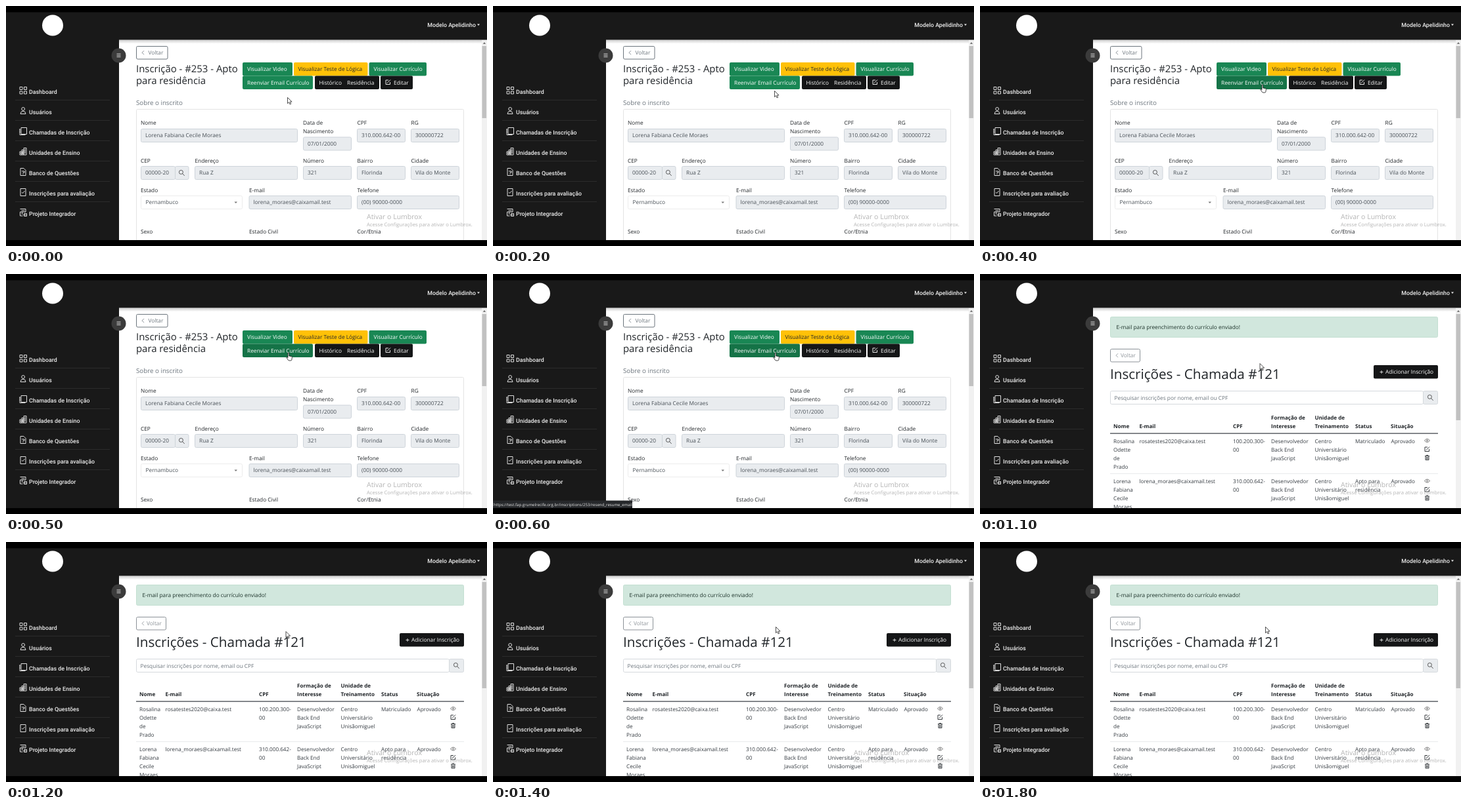
An HTML page that plays this animation: 732x366 px, repeating every 2.6 s.

```html
<!DOCTYPE html>
<html lang="pt-BR">
<head>
<meta charset="utf-8">
<title>Inscrições</title>
<style>
html, body { margin: 0; width: 100%; height: 100%; overflow: hidden; background: #000; }
svg { display: block; }
text { font: 8.3px "Open Sans", "Noto Sans", sans-serif; fill: #212529; text-rendering: geometricPrecision; white-space: pre; }
.side text { font: 500 8.8px Roboto, sans-serif; fill: #eee; }
</style>
</head>
<body>
<svg id="stage" width="732" height="366" viewBox="0 0 732 366"></svg>
<script>
const LOOP = 2600, INK = '#212529', DARK = '#151617', GREEN = '#198754', GREY = '#6c757d';

const text = (x, y, s, style = '') => `<text x="${x}" y="${y}" style="${style}">${s}</text>`;
const box = (x, y, w, h, fill, stroke = 'none', r = 0, extra = '') =>
  `<rect x="${x}" y="${y}" width="${w}" height="${h}" rx="${r}" fill="${fill}" stroke="${stroke}" ${extra}/>`;
const line = (d, x = 0, y = 0, color = INK, w = 1) =>
  `<path d="${d}" transform="translate(${x} ${y})" fill="none" stroke="${color}" stroke-width="${w}"/>`;
const group = (id, body, extra = '') => `<g id="${id}" ${extra}>${body}</g>`;
const lines = (x, y, list, style) => list.map((s, i) => text(x, y + i * 13.1, s, style)).join('');

const button = (x, y, w, label, fill, tx = x + 7, color = '#fff', id = '') =>
  box(x, y, w, 20.5, fill, 'none', 2, id && `id="${id}"`) + text(tx, y + 13.4, label, `fill:${color}`);
const field = (x, y, w, value) =>
  box(x + .5, y + .5, w - 1, 20, '#e9ecef', '#ced4da', 2) + text(x + 7, y + 13.4, value, 'fill:#495057');
const lens = (x, y) => line('M6.4 3.4a3 3 0 1 1-6 0a3 3 0 1 1 6 0M5.5 5.5l3.2 3.4', x, y, '#333', .8);
const back = (x, y, w, tx, color) =>
  box(x + .5, y + .5, w - 1, 19.5, '#fff', color, 2) +
  line('M3 0l-3 3l3 3', x + 9, y + 7.2, color, .8) + text(tx, y + 13.4, 'Voltar', `fill:${color}`);
const pencil = (x, y, color) => line('M4.5 1H.5v6.5H7V4M2.5 5.5L7.5.5', x, y, color, .9);
const scroll = h =>
  box(724, 52, 8, 305, '#f1f1f1') + box(724.5, 61, 6.5, h, '#c1c1c1') +
  '<path d="M725.8 58l2.2-3 2.2 3z" fill="#777"/>';

const MENU = [
  ['Dashboard', 'M.5.5h4v4h-4zM7 .5h4v4h-4zM.5 7h4v4h-4zM7 7h4v4h-4z'],
  ['Usuários', 'M8 3a2.4 2.4 0 1 1-4.8 0a2.4 2.4 0 1 1 4.8 0M1.500 10.5q0-4 4-4t4 4z'],
  ['Chamadas de Inscrição', 'M2.5.5H11v10H2.5zM.5 2v9.500h8.500M0 4h1.500M0 7h1.500'],
  ['Unidades de Ensino', 'M.5 11V6h3v5V3.5h3V11V.5h4V11zM8.5 2v7M5 5v5M2 7.5v2'],
  ['Banco de Questões', 'M1.5.5h5l3 3v8h-8zM3.5 5h4v2h-2v1.500M5 10h1'],
  ['Inscrições para avaliação', 'M1.5.5h8v11h-8zM3.5 6l1.5 1.5l3-3.5'],
  ['Projeto Integrador', 'M1 .5h8.5V5H1v6h4M3 3h5M7 7.5h4v4H7zM4 5v4M6 9.500h4']
];

const shell =
  box(0, 9.5, 732, 347.5, '#191919') +
  '<circle cx="71" cy="29.5" r="16" fill="#fff"/>' +
  text(715, 32, 'Modelo Apelidinho', 'text-anchor:end') +
  '<path d="M717 27.5h4l-2 2.5z" fill="#eee"/>' +
  MENU.map(([name, d], i) => {
    const y = 130 + i * 31;
    return line(d, 20.5, y - 7, '#ddd') + text(35, y + 3.6, name) +
      (i < 6 ? box(14, y + 13, 144, 1, '#2c2c2c') : '');
  }).join('');

const formPage =
  scroll(110) + back(198, 61, 48.5, 216.5, GREY) +
  text(198, 101, 'Inscrição - #253 - Apto', 'font-size:14.9px') +
  text(198, 119, 'para residência', 'font-size:14.9px') +
  button(360, 86, 76, 'Visualizar Video', GREEN) +
  button(438, 86, 112.5, 'Visualizar Teste de Lógica', '#ffc107', 444.5, INK) +
  button(552.5, 86, 87.5, 'Visualizar Currículo', GREEN, 559.5) +
  box(359, 105.5, 109, 22.5, 'none', '#8fc3aa', 3, 'id="ring" stroke-width="2"') +
  button(360, 106.5, 107, 'Reenviar Email Currículo', GREEN, 367, '#fff', 'send') +
  button(470, 106.5, 98, 'Histórico', DARK, 476.5) + text(519, 119.9, 'Residência', 'fill:#fff') +
  button(570, 106.5, 49, 'Editar', DARK, 590) + pencil(577.5, 112, '#fff') +
  text(198, 150.5, 'Sobre o inscrito', `font-size:9.75px;fill:${GREY}`) +
  box(198.5, 157.5, 498, 220, '#fff', '#e3e3e3', 2) +
  [[205, 181, 'Nome'], [452, 181, 'Data de'], [452, 194, 'Nascimento'], [534.5, 181, 'CPF'], [616.5, 181, 'RG'],
   [205, 239, 'CEP'], [287.5, 239, 'Endereço'], [452, 239, 'Número'], [534.5, 239, 'Bairro'], [616.5, 239, 'Cidade'],
   [205, 283.5, 'Estado'], [370, 283.5, 'E-mail'], [534.5, 283.5, 'Telefone'],
   [205, 347, 'Sexo'], [370, 347, 'Estado Civil'], [534.5, 347, 'Cor/Etnia']].map(a => text(...a)).join('') +
  [[205, 187, 239, 'Lorena Fabiana Cecile Moraes'], [452, 199.5, 74, '07/01/2000'],
   [534, 187, 74, '310.000.642-00'], [616, 187, 74, '300000722'],
   [205, 244, 53, '00000-20'], [257, 244, 21.5, ''], [287, 244, 157, 'Rua Z'], [452, 244, 74, '321'],
   [534, 244, 74, 'Florinda'], [616, 244, 74, 'Vila do Monte'],
   [369.5, 289, 156.5, 'lorena_moraes@caixamail.test'], [534, 289, 156, '(00) 90000-0000']].map(a => field(...a)).join('') +
  lens(263, 250) +
  box(205.5, 289.5, 154, 20, '#fff', '#ececec', 2) + text(212.5, 302.4, 'Pernambuco', 'fill:#495057') +
  '<path d="M347.5 298.5h4.5l-2.2 2.5z" fill="#777"/>';

const CELL = 'font-size:8.15px;fill:#343a40', HEAD = 'font-size:8.05px;font-weight:700';
const row = (y, name, mail, cpf, status) =>
  [[203, name], [242.5, [mail]], [385, cpf], [443, ['Desenvolvedor', 'Back End', 'JavaScript']],
   [509.5, ['Centro', 'Universitário', 'Unisãomiguel']], [571, status], [625.5, ['Aprovado']]]
    .map(([x, list]) => lines(x, y, list, CELL)).join('') +
  line('M0 3q4-5 8 0q-4 5-8 0M5 3a1 1 0 1 1-2 0a1 1 0 1 1 2 0', 676.5, y - 6.5, '#555', .8) +
  pencil(676.5, y + 5.5, INK) +
  line('M0 1.5h7M2.5 1V.3h2V1M1 2v5.5h5V2M2.7 3v3.5M4.3 3v3.5', 677, y + 18.5, INK, .9);

const listPage =
  scroll(162) +
  box(198.5, 65.5, 498, 31, '#d1e7dd', '#c3dfd1', 2) +
  text(207.5, 84, 'E-mail para preenchimento do currículo enviado!', 'fill:#1b3028') +
  back(198, 114, 46, 214, '#8c9298') +
  text(198, 160, 'Inscrições - Chamada #121', 'font-size:20.65px') +
  button(599, 139, 98, 'Adicionar Inscrição', DARK, 617) +
  line('M0 2.5h5M2.5 0v5', 608.5, 147, '#fff', .8) +
  box(198.5, 178.5, 476, 20, '#fff', '#d5d9dd', 2) +
  text(204.5, 191.8, 'Pesquisar inscrições por nome, email ou CPF', `fill:${GREY}`) +
  box(674.5, 178.5, 22, 20, '#e9ecef', '#d5d9dd', 2) + lens(681, 184) +
  [[203, 'Nome'], [242.5, 'E-mail'], [385, 'CPF'], [571, 'Status'], [625, 'Situação']]
    .map(([x, s]) => text(x, 235, s, HEAD)).join('') +
  lines(443, 222, ['Formação de', 'Interesse'], HEAD) +
  lines(509.5, 222, ['Unidade de', 'Treinamento'], HEAD) +
  box(198, 242.5, 499, 1.2, '#343a40') + box(198, 304, 499, 1, '#e8eaec') +
  row(257.5, ['Rosalina', 'Odette', 'de', 'Prado'], 'rosatestes2020@caixa.test', ['100.200.300-', '00'], ['Matriculado']) +
  row(319, ['Lorena', 'Fabiana', 'Cecile', 'Moraes'], 'lorena_moraes@caixamail.test', ['310.000.642-', '00'], ['Apto para', 'residência']);

const overlay =
  '<circle cx="171.5" cy="75.5" r="11" fill="#3b3b3b"/>' +
  line('M0 0h6M0 2.3h6M0 4.6h6', 168.5, 73, '#ddd', .9) +
  text(549, 324.5, 'Ativar o Lumbrox', 'font-size:10.5px;fill:#b4b4b4') +
  text(549, 336, 'Acesse Configurações para ativar o Lumbrox.', 'font-size:7.7px;fill:#b4b4b4') +
  group('status', box(0, 345.5, 212, 11.5, '#26282b') +
    text(1, 353.6, 'https://test.fap.grumelrecife.org.br/inscriptions/253/resend_resume_email', 'font-size:6.1px;fill:#e8e8e8'));

const arrow = '<path d="M.5.5v9.2l2.1-2l1.5 3.3l1.6-.7l-1.5-3.2h2.9z" fill="#fff" stroke="#222" stroke-width=".8"/>';
const hand = '<path d="M1 1q0-1 .9-1t.9 1v4l3.7.8q1 .3.9 1.5l-.5 3.2q-.2 1.5-1.5 1.5H2.6q-.8 0-1.3-.9l-2.5-3.8q.7-1.2 2.2.2z" fill="#fff" stroke="#111" stroke-width=".8"/>';

const $ = id => document.getElementById(id);
$('stage').innerHTML =
  '<clipPath id="view"><rect x="172" y="51.5" width="560" height="305.5"/></clipPath>' +
  '<linearGradient id="shade" x2="0" y2="1"><stop stop-color="#ccc"/><stop offset="1" stop-color="#fff"/></linearGradient>' +
  group('shell', shell, 'class="side"') +
  `<g clip-path="url(#view)">${box(172, 51.5, 560, 306, '#fff')}${box(172, 51.5, 560, 6, 'url(#shade)')}` +
  `${group('form', formPage)}${group('list', listPage)}</g>` +
  overlay + group('arrow', arrow) + group('hand', hand);

// Pointer stops: time, x, y
const PATH = [[0, 428, 139], [100, 428, 136], [200, 428, 129], [300, 428, 120], [1100, 425.5, 136], [1400, 430, 129], [1800, 434, 129]];
const show = (id, on) => $(id).setAttribute('visibility', on ? 'visible' : 'hidden');

function draw(now) {
  const t = now % LOOP;
  const [, x, y] = PATH.findLast(p => p[0] <= t);
  const sent = t >= 1100, over = t >= 300 && !sent;
  $('form').style.display = sent ? 'none' : '';
  $('list').style.display = sent ? '' : 'none';
  show('status', t >= 600 && !sent);
  show('arrow', !over);
  show('hand', over);
  for (const id of ['arrow', 'hand']) $(id).setAttribute('transform', `translate(${x} ${y})`);
  $('send').setAttribute('fill', t >= 700 ? '#146c43' : over ? '#157347' : GREEN);
  $('ring').setAttribute('opacity', t >= 800 ? 1 : t >= 700 ? .5 : 0);
  requestAnimationFrame(draw);
}
requestAnimationFrame(draw);
</script>
</body>
</html>
```
